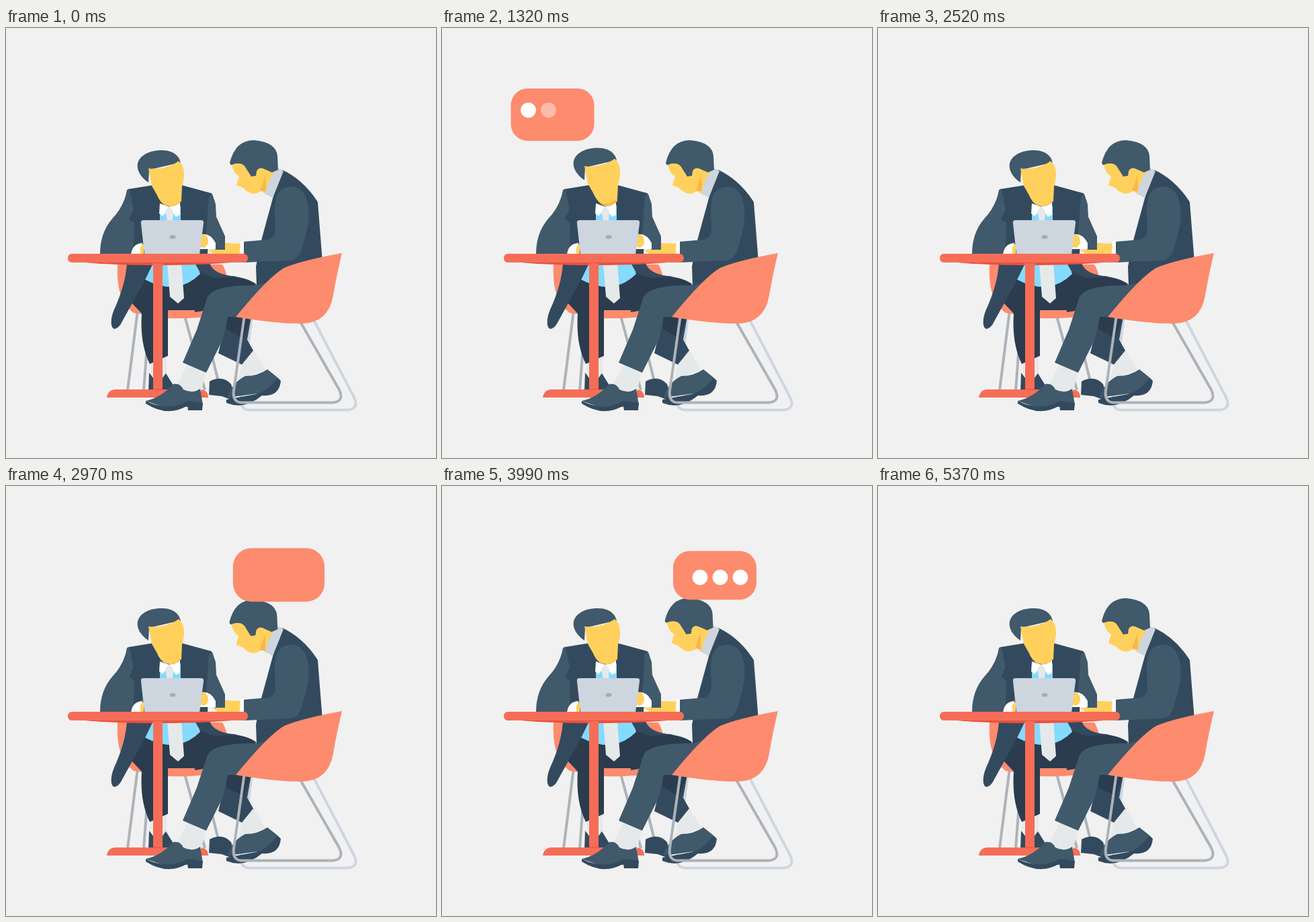
An HTML page that plays this animation: 640 px wide and 640 px high, repeating every 5.43 s.

```html
<!DOCTYPE html>
<html lang="en">
<head>
<meta charset="utf-8">
<title>Meeting</title>
<style>
html, body { margin: 0; width: 100%; height: 100%; overflow: hidden; background: #f1f1f1; }
svg { display: block; width: 100%; height: 100%; }
.navy { fill: #334a5e; }
.slate { fill: #40596b; }
.dark { fill: #2b3c4e; }
.skin { fill: #ffd15c; }
.shade { fill: #f8b64c; }
.coral { fill: #fd8b6d; }
.red { fill: #f66d57; }
.blue { fill: #84dbff; }
.white { fill: #fff; }
.pale { fill: #e6e9e9; }
.steel { fill: #cdd5df; }
.wire { fill: none; stroke: #acb3ba; stroke-width: 4; }
.wire.back { stroke: #cdd6e0; }
</style>
</head>
<body>
<svg viewBox="0 0 640 640">
  <!-- far chair -->
  <path class="wire" d="M196 420L181 539M211 460L205 539M265 425L296 539M291 425L316 526"/>
  <path class="coral" d="M166 352H322Q338 378 316 400V428Q280 433 242 432L190 424Q163 405 166 352Z"/>

  <!-- far man -->
  <path class="pale" d="M215 497L239 487V518H216Z"/>
  <path class="navy" d="M213 513L226 530 238 514 251 535V541H212Z"/>
  <path class="dark" d="M206 374L186 408 202 425Q199 470 214 500L241 488V420H290L373 382Q362 372 333 369L289 362Z"/>
  <path class="blue" d="M212 350H284L289 366Q255 400 206 374Z"/>
  <path class="pale" d="M240 350H261L265 402 256 410 244 400Z"/>
  <path class="navy" d="M180 350Q178 382 161 419C152 440 158 457 170 442L207 375 219 350ZM281 350H303Q309 368 345 370L310 372 289 364Z"/>
  <path class="navy" d="M181 240L218 234H262L306 246 300 336H183Z"/>
  <path class="slate" d="M180 241Q176 265 158 284 140 305 140 336H190L191 290 183 284 190 270 184 240ZM302 250L307 247 312 262 313 281 326 310V331H311Q314 313 298 307Z"/>
  <path class="blue" d="M229 268L260 264V290H229Z"/>
  <path class="white" d="M229 261L243 266 259 259V278L253 281 243 268 233 280 228 276Z"/>
  <path class="pale" d="M243 265L237 272 240 288H248L249 272Z"/>
  <path class="shade" d="M229 253L261 250V258Q243 275 229 253Z"/>
  <g id="farHead">
    <path class="slate" d="M212 230C182 209 196 182 232 182Q255 182 260 200L213 211Z"/>
    <path class="skin" d="M212 209Q238 212 257 198 270 209 262 236L261 257Q236 276 225 249L217 235Z"/>
  </g>

  <!-- laptop and hands -->
  <path class="white" d="M186 337Q188 321 203 320V337ZM291 307Q304 305 312 320V329H289Z"/>
  <path class="skin" d="M200 337Q198 324 205 321V337Z"/>
  <ellipse class="skin" cx="294" cy="317" rx="7" ry="10"/>
  <path class="steel" d="M201 291Q200 286 205 286H290Q295 286 294 291L288 337H206Z"/>
  <ellipse cx="248" cy="311" rx="4.5" ry="2.8" fill="#a3abb5"/>

  <!-- near man: far leg -->
  <path class="wire back" id="backFrame"/>
  <path class="navy" d="M303 526Q322 516 335 530L343 556 321 548 302 546Z"/>
  <path class="pale" d="M352 497L368 479 386 509 356 520 350 539H341Z"/>
  <path class="navy" d="M329 430H365L359 464 368 480 351 501 316 484Z"/>
  <path class="dark" d="M329 430H365L353 462 328 448Z"/>
  <path class="slate" d="M330 550Q335 529 356 518 375 518 389 508L404 520 390 542Z"/>
  <path class="navy" d="M328 553L366 546Q388 543 404 520L409 525Q407 549 381 547 355 569 328 558Z"/>

  <!-- table -->
  <path fill="#e9513f" d="M110 348H345Q300 353 226 353T110 348Z"/>
  <path class="red" d="M219 350H233V538H290Q301 539 301 550H150Q152 538 163 538H219Z"/>
  <path d="M219 538H233" stroke="#e9513f"/>

  <!-- near man: near leg -->
  <path class="dark" d="M281 423Q279 388 320 387L300 420Z"/>
  <path class="pale" d="M271 500L298 512 290 541Q268 550 254 532Z"/>
  <path class="slate" d="M400 370L372 383Q310 382 300 400L284 449 263 498 298 513 323 463 330 430H345Z"/>
  <path class="slate" d="M208 555Q231 550 249 530 259 528 264 538 277 545 289 537L293 561 242 567Z"/>
  <path class="navy" d="M208 555Q242 572 270 555L293 558 292 569H271L270 562Q241 580 208 559Z"/>

  <!-- near man: upper body -->
  <path class="skin" id="finger" d="M301 330H340V337H310Z"/>
  <path class="skin" id="palm" d="M326 320L350 321V340H316L326 331Z"/>
  <path class="white" d="M349 317H355V349H347Z"/>
  <path class="navy" d="M411 211Q443 226 464 259L471 348 373 384 372 355 380 316 398 250Z"/>
  <path class="slate" d="M424 236C455 236 455 285 443 318Q438 345 423 346L354 349V318L390 315Q402 312 401 295C398 255 401 238 424 236Z"/>
  <path class="skin" d="M378 214L405 208 387 248 377 240Z"/>
  <path class="steel" d="M404 208L413 213 397 253 386 247Q389 226 404 208Z"/>
  <g id="nearHead">
    <path class="skin" d="M336 202L360 195 397 206V213Q390 215 388 229L379 243Q366 252 353 238L343 234 347 221Q338 216 336 202Z"/>
    <path class="shade" d="M386 219L387 243 378 242Z"/>
    <path class="slate" d="M333 201Q341 167 369 167 402 170 404 190L405 211 396 215 387 211Q377 205 373 213L372 220 365 221 358 210Q352 197 335 204Z"/>
  </g>

  <!-- near chair and table top -->
  <path class="wire" id="frontFrame"/>
  <path class="coral" d="M500 335Q492 368 487 398 480 439 440 440 400 440 342 430 390 371 414 357 440 346 500 335Z"/>
  <rect class="red" x="92" y="336" width="268" height="13" rx="6"/>

  <g id="bubbles"></g>
</svg>
<script>
const LOOP = 5430, STEP = 30, TAU = 2 * Math.PI;
const $ = id => document.getElementById(id);

// Progress from 0 to 1 over a span of time
const ramp = (t, start, span) => Math.min(1, Math.max(0, (t - start) / span));
const ease = p => p * p * (3 - 2 * p);
const hump = p => Math.sin(Math.PI * p);
const move = (id, x, y) => $(id).setAttribute("transform", `translate(${x} ${y})`);

// Sled frame of the near chair
function frame(id, left, right, floor) {
  $(id).setAttribute("d", `M${left + 19} 420L${left + 2} ${floor - 18}q-2 18 12 18
    H${right - 12}q17 -2 9 -19L${right - 68} 425`);
}

function add(tag, parent, attrs) {
  const el = document.createElementNS("http://www.w3.org/2000/svg", tag);
  for (const k in attrs) el.setAttribute(k, attrs[k]);
  return parent.appendChild(el);
}

// Pops in with an overshoot, floats, and shows its dots one by one
function bubble({ x, y, height, dotX, dotY, start, end, peak }) {
  const group = add("g", $("bubbles"), {});
  const box = add("rect", group, { class: "coral", x: -62, y: -height / 2, width: 124, height, rx: 25 });
  const dots = [0, 1, 2].map(i =>
    add("circle", group, { class: "white", cx: dotX + 30 * i, cy: dotY, r: 11.4 }));
  return t => {
    const grow = ramp(t, start, 180), leave = ease(ramp(t, end - 120, 120));
    const size = (ease(grow) + 0.45 * hump(grow) * grow) * (1 - leave);
    const float = y - 3.2 * Math.cos(TAU * (t - peak) / 1080);
    box.setAttribute("transform", `translate(${x} ${float}) scale(${size})`);
    const fade = 1 - ramp(t, end - 180, 120);
    dots.forEach((dot, i) =>
      dot.setAttribute("opacity", ease(ramp(t, start + 400 + 240 * i, 180)) * fade));
  };
}

frame("frontFrame", 337, 499, 557.5);
frame("backFrame", 348, 521, 568.5);
const bubbles = [
  { x: 164.5, y: 125.7, height: 78, dotX: 128.5, dotY: 122.3, start: 600, end: 2430, peak: 780 },
  { x: 406, y: 129.9, height: 72.5, dotX: 384, dotY: 136, start: 2830, end: 4560, peak: 3390 }
].map(bubble);

function draw(now) {
  const t = Math.floor(now % LOOP / STEP) * STEP;
  const far = ramp(t, 0, 1850), near = ramp(t, 2520, 2850), tap = hump(ramp(t, 2850, 1080));
  move("farHead", 0, 3.6 * Math.sin(TAU * far));
  move("nearHead", -1.4 * hump(near), 2.6 * Math.sin(TAU * near));
  move("palm", 0, -3 * tap);
  move("finger", 18 * tap, 0);
  bubbles.forEach(show => show(t));
}

const begin = performance.now();
function tick() {
  draw(performance.now() - begin);
  requestAnimationFrame(tick);
}
tick();
</script>
</body>
</html>
```
